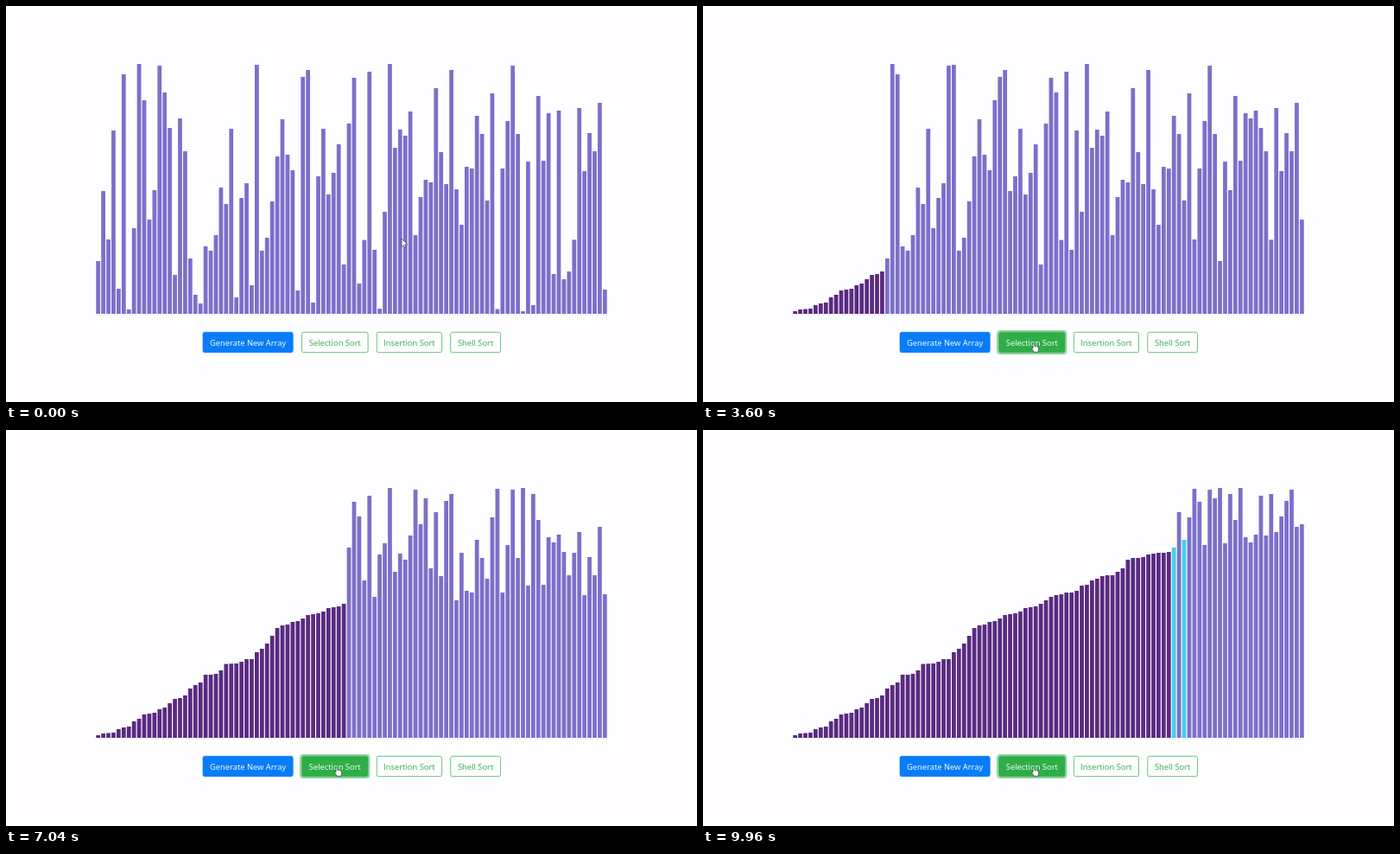
An HTML page that plays this animation: 800 px wide and 458 px high, repeating every 10000 ms.

```html
<!DOCTYPE html>
<html lang="en">
<head>
<meta charset="utf-8">
<title>Sorting Visualizer</title>
<style>
  html, body { margin: 0; width: 100%; height: 100%; overflow: hidden; background: #fefdff; }
  svg { display: block; width: 800px; height: 458px; }
  text { font: 9.4px "Open Sans", "Noto Sans", sans-serif; text-anchor: middle; }
</style>
</head>
<body>
<svg id="stage" viewBox="0 0 800 458">
  <g id="bars"></g>
  <g id="buttons"></g>
  <g id="arrow">
    <path d="M0 0V9.4L2.2 7.4L3.7 10.8L5.2 10.1L3.8 6.9H6.7Z" fill="#fff" stroke="#222" stroke-width=".6"/>
  </g>
  <g id="hand">
    <path d="M-.9 .8Q0 -.6 .9 .8V4Q1.9 3.3 2.6 4.3Q3.6 3.7 4.2 4.8Q5.6 4.5 5.6 6V8Q5.4 9.4 4.6 10.8H.3Q-.6 9-2.6 7Q-2.9 5.7-.9 6.4Z" fill="#fff" stroke="#222" stroke-width=".6"/>
  </g>
</svg>
<script>
const LOOP = 10000, TICK = 40, BASE = 356, PITCH = 5.926, LEFT = 104.3;
const IDLE = '#7c6fca', SORTED = '#592a81', ACTIVE = '#47cfe7';
const GREEN = '#2fae48';

// Top edge of each bar, left to right
const tops = [
  295, 214, 270, 144, 327, 79, 351, 257, 67, 109, 247, 213, 69, 100, 141, 311, 130, 168, 292, 334,
  344, 278, 283, 265, 210, 229, 142, 337, 222, 205, 323, 68, 283, 268, 226, 174, 131, 172, 190, 329,
  82, 74, 343, 197, 142, 218, 193, 160, 299, 136, 83, 321, 270.6, 76, 282, 350, 238, 67, 164, 143,
  150, 122, 265, 221, 201, 204, 95, 169, 206, 74, 212, 253, 186, 188, 127, 148, 225, 101, 350.5, 188,
  133, 69, 148, 353, 180, 346, 104, 179, 124, 310, 121, 316, 307, 270.3, 118, 191, 147, 168, 112, 328
];

// [ms, phase]: each sorting step has three phases (mark, swap, settle)
const pace = [[1576, 0], [2720, 30.5], [4520, 78.5], [5600, 108.5], [7040, 146.5], [8040, 173.5], [9960, 223.5], [10000, 224.4]];
// [ms, x, y] of the pointer tip
const path = [[0, 458, 269], [240, 458, 269], [800, 394, 400], [960, 386, 401], [1240, 383, 389.5]];
const HOVER = 1080, CLICK = 1500;

const $ = id => document.getElementById(id);
const clamp = v => Math.max(0, Math.min(1, v));
const smooth = v => v * v * (3 - 2 * v);

function add(parent, tag, attrs, text = '') {
  const el = document.createElementNS('http://www.w3.org/2000/svg', tag);
  for (const k in attrs) el.setAttribute(k, attrs[k]);
  el.textContent = text;
  return parent.appendChild(el);
}

function lookup(table, t, col, ease = v => v) {
  let i = 1;
  while (i < table.length - 1 && t > table[i][0]) i++;
  const a = table[i - 1], b = table[i];
  return a[col] + (b[col] - a[col]) * ease(clamp((t - a[0]) / (b[0] - a[0])));
}

function selectionSwaps(values) {
  const a = values.slice();
  return a.map((_, i) => {
    let min = i;
    for (let j = i + 1; j < a.length; j++) if (a[j] > a[min]) min = j;
    [a[i], a[min]] = [a[min], a[i]];
    return min;
  });
}

function button(x, w, label, fill, stroke, color) {
  const box = { x: x + .3, y: 377.3, width: w - .6, height: 23.4, rx: 2.2 };
  const rect = add($('buttons'), 'rect', { ...box, fill, stroke, 'stroke-width': .7 });
  const text = add($('buttons'), 'text', { x: x + w / 2, y: 392.6, fill: color }, label);
  return { rect, text };
}

const swaps = selectionSwaps(tops);
const bars = tops.map((_, i) => add($('bars'), 'rect', { x: LEFT + i * PITCH, width: 4.75 }));
const ring = add($('buttons'), 'rect', { x: 341, y: 376, width: 79.4, height: 26, rx: 3, fill: 'none', stroke: GREEN, 'stroke-opacity': .5, 'stroke-width': 2 });

button(227.7, 104.8, 'Generate New Array', '#087cf9', '#087cf9', '#fff');
const select = button(342.2, 77.2, 'Selection Sort', GREEN, GREEN, GREEN);
button(429, 75.8, 'Insertion Sort', 'none', GREEN, GREEN);
button(514.4, 58.4, 'Shell Sort', 'none', GREEN, GREEN);

function drawBars(t) {
  const phase = t < pace[0][0] ? -1 : Math.floor(lookup(pace, t, 1));
  const step = phase < 0 ? -1 : Math.floor(phase / 3), part = phase % 3;
  const a = tops.slice();
  const done = phase < 0 ? 0 : part ? step + 1 : step;
  for (let i = 0; i < done; i++) [a[i], a[swaps[i]]] = [a[swaps[i]], a[i]];
  bars.forEach((bar, i) => {
    const marked = step >= 0 && part < 2 && (i === step || i === swaps[step]);
    const fill = marked ? ACTIVE : i <= step ? SORTED : IDLE;
    bar.setAttribute('y', a[i]);
    bar.setAttribute('height', BASE - a[i]);
    bar.setAttribute('fill', fill);
  });
}

function drawPointer(t) {
  const x = lookup(path, t, 1, smooth), y = lookup(path, t, 2, smooth);
  const over = t >= HOVER, lit = clamp((t - HOVER) / 150);
  for (const id of ['arrow', 'hand']) {
    $(id).setAttribute('transform', `translate(${x} ${y})`);
    $(id).style.display = (id === 'hand') === over ? '' : 'none';
  }
  select.rect.setAttribute('fill-opacity', lit);
  select.text.setAttribute('fill', lit > .5 ? '#fff' : GREEN);
  ring.setAttribute('opacity', clamp((t - CLICK) / 150));
}

const start = performance.now();
function draw() {
  const now = Math.max(0, performance.now() - start) % LOOP;
  const t = Math.floor(now / TICK) * TICK;
  drawBars(t);
  drawPointer(t);
  requestAnimationFrame(draw);
}
draw();
</script>
</body>
</html>
```
